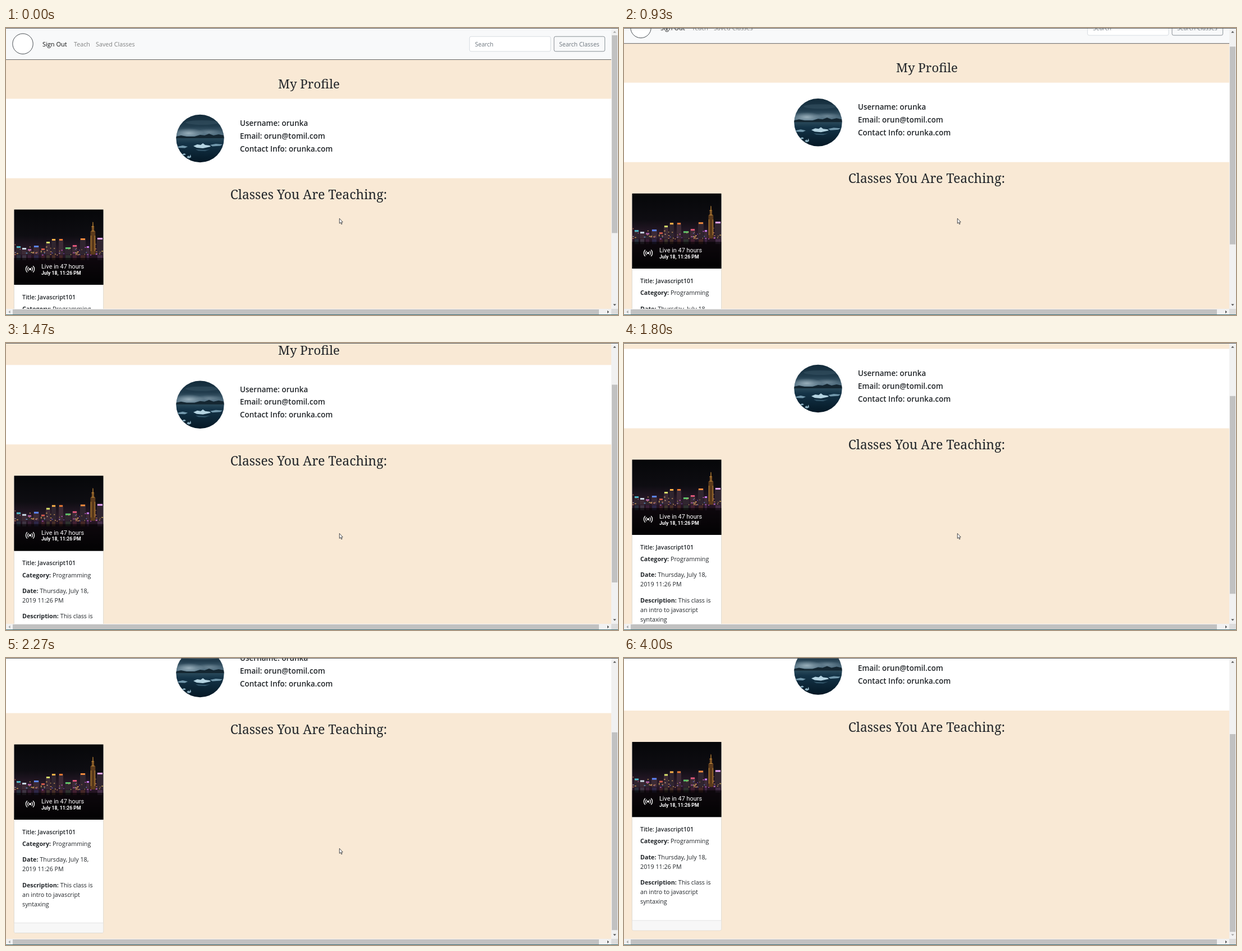
An HTML page that plays this animation: 1091 px wide and 513 px high, repeating every 4540 ms.

```html
<!DOCTYPE html>
<html lang="en">
<head>
<meta charset="utf-8">
<title>My Profile</title>
<style>
  html, body { margin: 0; width: 100%; height: 100%; overflow: hidden; background: #f9e9d5; }
  svg { display: block; width: 100%; height: 100%; }
  text { font: 10.75px "Open Sans", "Noto Sans", sans-serif; fill: #212529; white-space: pre; }
  .nav { fill: #7f8081; }
  .active { font-size: 11px; fill: #0c0d0e; }
  .muted { font-size: 10.5px; fill: #6c757d; }
  .title { font: 22.4px "Noto Serif", serif; text-anchor: middle; }
  .wide { font-size: 22.9px; }
  .info { font-size: 13.5px; font-weight: 600; }
  .medium { font-size: 10.5px; font-weight: 600; }
  .strong { font-weight: 700; }
  .live { font: 400 10.9px Roboto, sans-serif; fill: #fff; }
  .when { font: 700 8.7px Roboto, sans-serif; fill: #fff; }
</style>
</head>
<body>
<svg viewBox="0 0 1091 513" preserveAspectRatio="none">
  <defs>
    <linearGradient id="sky" x1="0" y1="0" x2="0" y2="1">
      <stop offset="0" stop-color="#122a39"/>
      <stop offset=".25" stop-color="#213c4d"/>
      <stop offset=".44" stop-color="#557385"/>
      <stop offset=".5" stop-color="#284859"/>
      <stop offset=".6" stop-color="#143347"/>
      <stop offset="1" stop-color="#041724"/>
    </linearGradient>
    <radialGradient id="cloud">
      <stop offset="0" stop-color="#b4c8d2" stop-opacity=".75"/>
      <stop offset="1" stop-color="#b4c8d2" stop-opacity="0"/>
    </radialGradient>
    <linearGradient id="night" x1="0" y1="0" x2="0" y2="1">
      <stop offset="0" stop-color="#060709"/>
      <stop offset=".35" stop-color="#0e0d12"/>
      <stop offset=".56" stop-color="#2c1b2c"/>
      <stop offset=".66" stop-color="#21121f"/>
      <stop offset="1" stop-color="#050507"/>
    </linearGradient>
    <filter id="glow" x="-10%" y="-30%" width="120%" height="160%"><feGaussianBlur stdDeviation=".7"/></filter>
    <clipPath id="round"><circle cx="346" cy="197.5" r="42.7"/></clipPath>
    <clipPath id="photo"><rect x="14.5" y="324.6" width="159" height="134.4"/></clipPath>
    <clipPath id="view"><rect width="1079" height="502"/></clipPath>
  </defs>

  <rect width="1091" height="513" fill="#f9e9d5"/>
  <g clip-path="url(#view)">
    <g id="page">
      <rect width="1079" height="56.2" fill="#f8f9fa"/>
      <rect y="56.1" width="1079" height=".75" fill="#343a40"/>
      <circle cx="30" cy="28.3" r="18.2" fill="#fff" stroke="#343a40" stroke-width=".9"/>
      <text class="active" x="65" y="33">Sign Out</text>
      <text class="nav" x="121" y="33">Teach</text>
      <text class="nav" x="160" y="33">Saved Classes</text>
      <rect x="826.3" y="15.2" width="144.6" height="26.6" rx="2.8" fill="#fff" stroke="#ced4da" stroke-width=".8"/>
      <text class="muted" x="836" y="33">Search</text>
      <rect x="977" y="15.2" width="90.6" height="26.6" rx="2.8" fill="none" stroke="#6c757d" stroke-width=".8"/>
      <text class="muted" x="986" y="33">Search Classes</text>

      <text class="title" x="540" y="108">My Profile</text>
      <rect y="126.5" width="1079" height="142" fill="#fff"/>
      <g clip-path="url(#round)">
        <rect x="303" y="154" width="86" height="87" fill="url(#sky)"/>
        <ellipse cx="326" cy="188" rx="27" ry="9" fill="url(#cloud)"/>
        <ellipse cx="362" cy="186" rx="24" ry="6" fill="url(#cloud)" opacity=".5"/>
        <ellipse cx="350" cy="169" rx="30" ry="4" fill="#3b5766" opacity=".5"/>
        <path d="M303 197v-3l9-2 10 2 14 0 10-3 8 1 8-3 8 3 9-2 10 2v5z" fill="#142631"/>
        <path d="M334 211l7-3 6 1 4-3 4 3 8 1 2 2-14 3-11-1z" fill="#b4d3e1"/>
        <path d="M306 212l9-2 9 2-5 2.500-12-.5zM364 209l10-2 12 1-4 2.500-14 1z" fill="#7399ad"/>
        <path d="M322 231l3-3 2 2 2-4 1 5-4 2zM313 226l5-2 3 2-4 1.500z" fill="#8fb2c3"/>
        <path d="M338 217l18 1 8-1-9 3-12-.5z" fill="#35586c"/>
      </g>
      <text class="info" x="417" y="175">Username: orunka</text>
      <text class="info" x="417" y="197.7">Email: orun@tomil.com</text>
      <text class="info" x="417" y="220.5">Contact Info: orunka.com</text>

      <text class="title wide" x="539.5" y="306">Classes You Are Teaching:</text>
      <rect x="14.4" y="324.9" width="159.2" height="336.6" rx="2.5" fill="#fff" stroke="#d9d5ce" stroke-width=".8"/>
      <path d="M14.8 643.5h158.4v15.5q0 2.1-2.1 2.1h-154.2q-2.1 0-2.1-2.1z" fill="#f7f7f7"/>
      <rect x="14.8" y="643.2" width="158.4" height=".8" fill="#dfdfdf"/>
      <g clip-path="url(#photo)">
        <rect x="14" y="324" width="160" height="135" fill="url(#night)"/>
        <g id="city"></g>
        <path d="M150.500 405v-42h2v-9h1.400l1-9 1 9h1.400v9h2v42z" fill="#5c3b1c"/>
        <path d="M152 363h6M152.500 355h4M155 347v16M151.500 371v28M158.500 371v28" stroke="#c88f3a" fill="none"/>
        <rect x="14" y="411" width="160" height="48" fill="#000" opacity=".6"/>
      </g>
      <g fill="none" stroke="#fff" stroke-width="1.300">
        <circle cx="43" cy="431" r="2" fill="#fff" stroke="none"/>
        <path d="M40.300 427.500a4.600 4.600 0 0 0 0 7M45.700 427.500a4.600 4.600 0 0 1 0 7M37.800 425.300a8 8 0 0 0 0 11.400M48.200 425.300a8 8 0 0 1 0 11.400"/>
      </g>
      <text class="live" x="63" y="429.800">Live in 47 hours</text>
      <text class="when" x="63" y="440.600">July 18, 11:26 PM</text>

      <text class="medium" x="29" y="484.700">Title: Javascript101</text>
      <text x="29" y="505.800"><tspan class="strong">Category:</tspan> Programming</text>
      <text x="29" y="534.300"><tspan class="strong">Date:</tspan> Thursday, July 18,</text>
      <text x="29" y="551.300">2019 11:26 PM</text>
      <text x="29" y="579.700"><tspan class="strong">Description:</tspan> This class is</text>
      <text x="29" y="596.800">an intro to javascript</text>
      <text x="29" y="613.800">syntaxing</text>
    </g>
  </g>

  <rect x="1079" width="12" height="502" fill="#f1f1f1"/>
  <rect y="502" width="1079" height="11" fill="#f1f1f1"/>
  <rect x="1079" y="502" width="12" height="11" fill="#dcdcdc"/>
  <rect id="vthumb" x="1080" y="13" width="10" height="353.500" fill="#c1c1c1"/>
  <rect id="hthumb" x="12" y="503" width="1045" height="9" fill="#c1c1c1"/>
  <path id="up" d="M1082.300 8.500l2.700-3 2.700 3z"/>
  <path id="down" d="M1082.300 493.500l2.700 3 2.700-3z"/>
  <path d="M7.500 504.800l-3 2.700 3 2.700z" fill="#a3a3a3"/>
  <path d="M1072 504.800l3 2.700-3 2.700z" fill="#505050"/>
  <rect width="1091" height="1" fill="#5a5c5e"/>
  <rect y="512" width="1091" height="1" fill="#3f7076"/>
  <path id="cursor" d="M.4 .4V9.300L2.400 7.500 3.800 10.800 5.200 10.200 3.800 7H6.400Z" fill="#fff" stroke="#22252a" stroke-width=".8"/>
</svg>
<script>
const LOOP = 4540, STEP = 1000 / 15, MAX_SCROLL = 174.5;
const $ = id => document.getElementById(id);

// Skyline: x, width, top, lit sign colour
const towers = [
  [18, 9, 390, '#49b7c9'], [28, 9, 393, '#c9d8e6'], [38, 8, 395, '#a65a9e'],
  [49, 10, 389, '#5c86ff'], [62, 8, 394, '#d05a4a'], [71, 8, 382, '#d5e06a'],
  [81, 8, 377, '#ffb347'], [94, 8, 377, '#e87a32'], [105, 11, 392, '#5ec46a'],
  [118, 9, 388, '#e0567a'], [132, 10, 376, '#f08a3c'], [143, 6, 390, '#c77cf0'],
  [162, 11, 375, '#e6a6ff']
];
const rect = (x, y, w, h, fill, opacity = 1) =>
  `<rect x="${x}" y="${y}" width="${w}" height="${h}" fill="${fill}" opacity="${opacity}"/>`;

let seed = 7;
const random = () => (seed = seed * 16807 % 2147483647) / 2147483647;
const blocks = towers.map(([x, w, top, sign], i) =>
  rect(x, top, w, 405 - top, i % 2 ? '#3c2a35' : '#30252f') +
  rect(x + 1, 406, w - 2, 9, sign, .16)
).join('');
const signs = towers.map(([x, w, top, sign]) =>
  rect(x + 1, top, w - 2, 3, sign)
).join('');
const lamps = Array.from({ length: 70 }, () => {
  const x = 15 + random() * 157, y = 385 + 20 * Math.sqrt(random());
  const hue = random() < .7 ? 15 + random() * 30 : 200 + random() * 130;
  return rect(x, y, 1 + random() * 2, 1.6, `hsl(${hue} 65% 62%)`, .8);
}).join('');
$('city').innerHTML = `${blocks}<g filter="url(#glow)">${signs}${lamps}</g>`;

// Scroll curve: step, offset, slope per step
const keys = [[10, 0, 0], [11, 3, 5], [17, 57.5, 7], [27, 116, 6.6], [34, 170, 2.6], [37, MAX_SCROLL, 0]];

function scrollAt(k) {
  if (k <= 10) return 0;
  if (k >= 37) return MAX_SCROLL;
  const i = keys.findIndex(key => key[0] > k);
  const [k0, y0, m0] = keys[i - 1], [k1, y1, m1] = keys[i];
  const d = k1 - k0, u = (k - k0) / d, s = u * u * (3 - 2 * u);
  return y0 + (y1 - y0) * s + d * u * (1 - u) * (m0 * (1 - u) - m1 * u);
}

function cursorAt(k) {
  if (k < 47) return [594, 340];
  if (k <= 54) {
    const u = (k - 47) / 7, s = u * u * (3 - 2 * u);
    return [581 - 433 * s, 342 + 148 * s];
  }
  return [148 - 2 * (k - 54), 490 + 4 * (k - 54)];
}

function draw(t) {
  const k = Math.floor((t + 3.4) / STEP);
  const y = scrollAt(k), [cx, cy] = cursorAt(k);
  $('page').setAttribute('transform', `translate(0 ${-y})`);
  $('vthumb').setAttribute('y', 13 + y * .705);
  $('up').setAttribute('fill', y > 0 ? '#505050' : '#a3a3a3');
  $('down').setAttribute('fill', y < MAX_SCROLL ? '#505050' : '#a3a3a3');
  $('hthumb').setAttribute('fill', k >= 57 && k < 60 ? '#a8a8a8' : '#c1c1c1');
  $('cursor').setAttribute('transform', `translate(${cx} ${cy})`);
  $('cursor').setAttribute('visibility', k < 60 ? 'visible' : 'hidden');
}

const start = performance.now();
function tick() {
  draw((performance.now() - start) % LOOP);
  requestAnimationFrame(tick);
}
tick();
</script>
</body>
</html>
```
